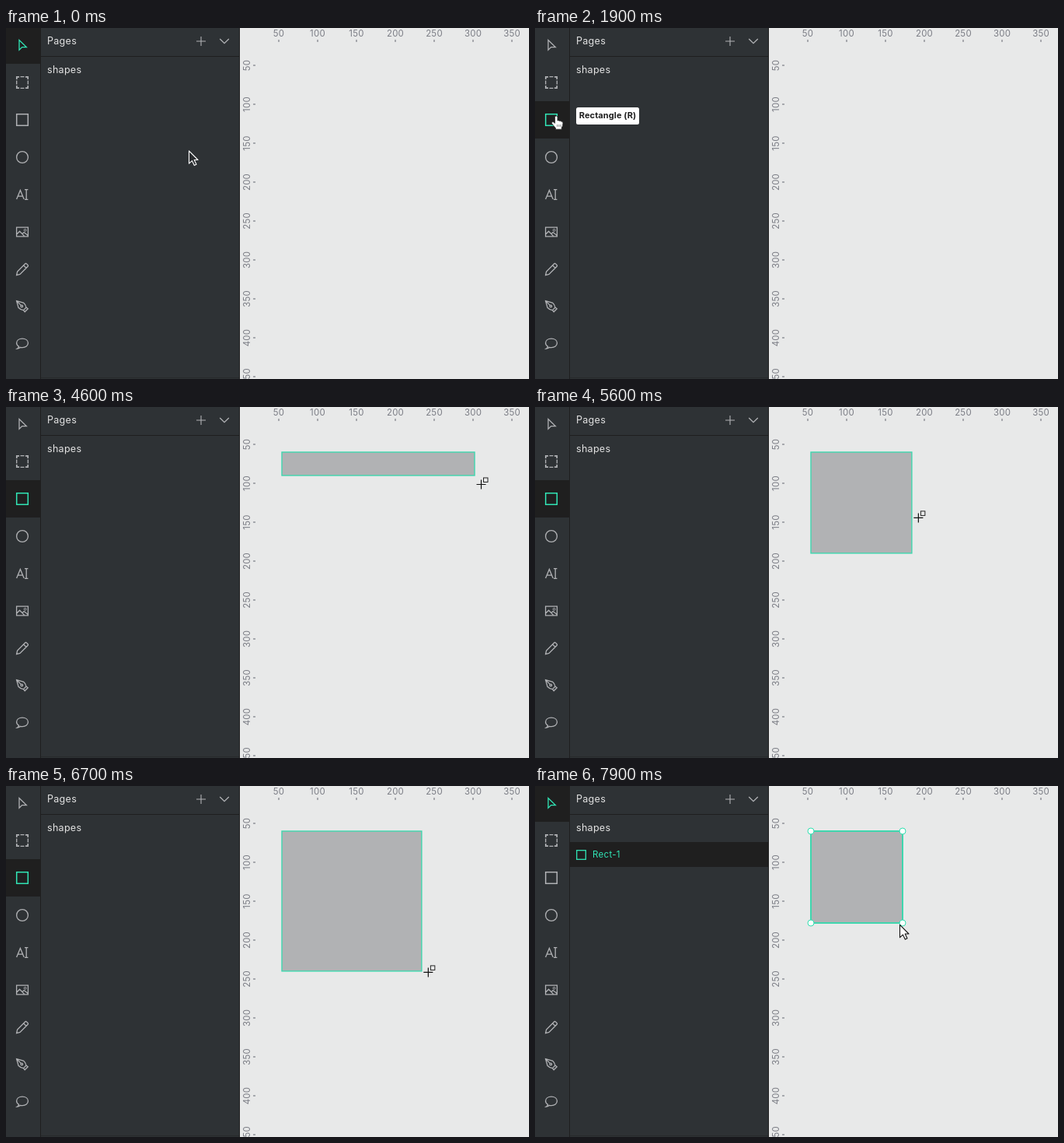
An HTML page that plays this animation: 673x451 px, repeating every 8000 ms.

```html
<!DOCTYPE html>
<html lang="en">
<head>
<meta charset="utf-8">
<title>Drawing a square</title>
<style>
  html, body { margin: 0; width: 100%; height: 100%; overflow: hidden; background: #e8e9e9; }
  svg { display: block; width: 100vw; height: 100vh; }
  text { font-family: Inter, "Open Sans", sans-serif; }
  .tool { color: #b1b2b5; }
  .tool.on { color: #31e6b6; }
  .tool .bg { fill: none; }
  .tool.on .bg { fill: #1f1f1f; }
  .line { fill: none; stroke: currentColor; stroke-width: 1.3; }
  .label { font-size: 12.5px; letter-spacing: .3px; fill: #e3e3e3; }
  .ruler text { font-size: 11.4px; letter-spacing: .25px; fill: #7b7d85; text-anchor: middle; }
  .ruler path { stroke: #7b7d85; stroke-width: 1.2; }
</style>
</head>
<body>
<svg viewBox="0 0 673 451">
  <rect width="673" height="451" fill="#e8e9e9"/>
  <g id="ruler" class="ruler"></g>

  <rect width="301" height="451" fill="#2e3235"/>
  <path d="M44.5 0V451M300.5 0V451M45 36.5H300" stroke="#1f1f1f"/>
  <path d="M45 449.5H300" stroke="#1f1f1f" opacity=".4"/>

  <g id="move" class="tool">
    <rect class="bg" width="44" height="46"/>
    <path class="line" d="M17 15.6V28.2L20.7 24.6H26.3Z"/>
  </g>
  <g class="tool line">
    <path stroke-width="1.7" d="M13.8 66V62.8H17M25 62.8H28.2V66M28.2 74V77.2H25M17 77.2H13.8V74"/>
    <path d="M18.5 62.7h5M18.5 77.3h5M13.7 67.5v5M28.3 67.5v5"/>
  </g>
  <g id="box" class="tool">
    <rect class="bg" y="94" width="44" height="48"/>
    <rect class="line" x="13.7" y="110.7" width="14.6" height="14.6" style="stroke-width:1.5"/>
  </g>
  <g class="tool line">
    <circle cx="21" cy="166" r="7.4"/>
    <path d="M13.6 220L18.4 208.4L23.2 220M15.2 216.2H21.6M24 207.6H28.4M24 220.4H28.4M26.2 207.6V220.4"/>
    <path d="M13.6 256.2H28.4V267.8H13.6ZM13.8 265L17.6 261.2L23.6 267.4M21 264.6L23.2 262.6L28.2 266.4"/>
    <circle cx="24.6" cy="259.8" r="1.4" stroke-width="1"/>
    <path d="M13.6 317.6L14.6 313L24.8 302.8Q25.6 302.2 26.4 302.9L28.2 304.7Q28.8 305.5 28.2 306.3L18 316.5ZM22.6 305L26 308.4"/>
    <path d="M13.6 350.6L22.5 353Q25.5 355.5 26 359L22.5 362.6Q18.5 362 16 359.2ZM14 351L19.3 356.4M26 359L28.2 360.8L24.2 364.7L22.5 362.6"/>
    <circle cx="20.3" cy="357.4" r="1.3"/>
    <path d="M16.6 409.4Q13.6 407.6 13.6 404.8C13.6 401.4 16.8 399.2 21 399.2S28.4 401.4 28.4 404.8S25.2 410.6 21 410.6Q19.6 410.6 18.6 410.3Q17 411.8 14.4 412Q16.2 410.8 16.6 409.4Z"/>
    <path d="M275.2 14L281 19.6L286.8 14"/>
    <path style="stroke-width:1.1" d="M245 17H257M251 11V23"/>
  </g>

  <text class="label" x="53" y="21">Pages</text>
  <text class="label" x="53" y="58">shapes</text>

  <g id="layer">
    <rect x="45" y="72" width="255" height="32" fill="#1f1f1f"/>
    <rect x="53.7" y="82.7" width="11.6" height="11.6" fill="none" stroke="#31e6b6" stroke-width="1.3"/>
    <text x="74" y="92" font-size="11.5" letter-spacing=".3" fill="#31e6b6">Rect-1</text>
  </g>

  <g id="tip">
    <rect x="53" y="102" width="81" height="22" rx="2.5" fill="#fff"/>
    <text x="93.5" y="116.4" font-size="11" font-weight="700" letter-spacing=".1" text-anchor="middle" fill="#1f1f1f">Rectangle (R)</text>
  </g>

  <rect id="shape" x="355" y="58" fill="#b1b2b4" stroke="#3fd6ae"/>
  <g id="handles" fill="#fff" stroke="#31dfb0"></g>

  <g id="arrow">
    <path d="M.5 .8V17.2L4.4 13.6L7.3 19.6L10 18.3L7.2 12.5H12Z" stroke-width="1.1" stroke-linejoin="round"/>
  </g>
  <g id="hand">
    <path d="M-1.9 .8Q-.2 -1 1.5 .8V6Q3 5.2 4 6.5Q5.4 5.8 6.3 7.1Q8.6 6.8 8.5 9.2Q8.5 13.5 6.8 15V17.2H-1V15.6Q-3.6 12.6 -5.9 9.6Q-6.4 7.7 -4.5 7.5Q-3 8 -1.9 9.4Z" fill="#fff" stroke="#222" stroke-width=".8"/>
    <path d="M1.2 11V14M3.4 11V14M5.6 11V14" stroke="#555" stroke-width=".7"/>
  </g>
  <g id="cross" fill="none" stroke="#111">
    <path d="M-6 0H6M0 -6V6" stroke-width="1.2"/>
    <rect x="3" y="-8.5" width="5.5" height="5.5" stroke-width=".9"/>
  </g>
</svg>
<script>
const $ = id => document.getElementById(id);
const LOOP = 8000, STEP = 100, X0 = 355, Y0 = 58, SIDE = 118;
const HOVER = 1000, PICK = 1900, LEAVE = 2800, DRAG = 3800, SQUARE = 5300, DROP = 7900;

const smooth = u => u * u * (3 - 2 * u);
const linear = u => u;
const mix = (a, b, u) => a + (b - a) * u;
const progress = (t, from, to) => Math.min(1, Math.max(0, (t - from) / (to - from)));

// Pointer moves; "via" bends the way into a quadratic curve.
const home = [235, 157];
const moves = [
  { from: 100, to: HOVER, end: [27.5, 113], ease: smooth },
  { from: 2600, to: 3600, end: [363.5, 69.5], via: [100, 238], ease: smooth },
  { from: 3700, to: 4600, end: [611.5, 99.5], ease: smooth },
  { from: 5200, to: 6000, end: [488, 196], via: [437, 137], ease: linear },
  { from: 6100, to: 6450, end: [552.5, 246.5], ease: smooth },
  { from: 6450, to: 7600, end: [477, 188], ease: smooth }
];

function pointer(t) {
  let at = home;
  for (const { from, to, end, via, ease } of moves) {
    if (t <= from) break;
    const u = ease(progress(t, from, to));
    at = at.map((a, k) => via
      ? mix(mix(a, via[k], u), mix(via[k], end[k], u), u)
      : mix(a, end[k], u));
  }
  return at;
}

function show(id, on) {
  $(id).style.display = on ? "" : "none";
}

function attrs(id, map) {
  for (const k in map) $(id).setAttribute(k, map[k]);
}

function drawShape(t, x, y) {
  const done = t >= DROP;
  let w = Math.max(0, x - 8.5 - X0), h = Math.max(0, y - 11.5 - Y0);
  if (t >= SQUARE) w = h = Math.max(w, h);
  if (done) w = h = SIDE;
  show("shape", t >= DRAG);
  attrs("shape", { width: w, height: h, "stroke-width": done ? 2 : 1.4 });
  show("handles", done);
}

function drawPointer(kind, x, y, done) {
  for (const id of ["arrow", "hand", "cross"]) show(id, id === kind);
  attrs(kind, { transform: `translate(${x} ${y})` });
  attrs("arrow", { fill: done ? "#fff" : "#2a2d30", stroke: done ? "#111" : "#fff" });
}

function draw(t) {
  const done = t >= DROP;
  const [x, y] = done ? [469, 177.5] : pointer(t);
  const hover = x < 44;
  drawPointer(hover ? "hand" : x > 301 && !done ? "cross" : "arrow", x, y, done);
  drawShape(t, x, y);
  $("move").classList.toggle("on", t < PICK || done);
  $("box").classList.toggle("on", !done && (t >= PICK || hover));
  show("tip", t > HOVER && t < LEAVE);
  $("tip").style.opacity = smooth(progress(t, HOVER, 1600));
  show("layer", done);
}

let marks = "";
for (let n = 50; n <= 450; n += 50) {
  const x = 301 + n, y = n - 2;
  marks += `<text x="${x}" y="11">${n}</text><path d="M${x} 15V18"/>`
    + `<text transform="translate(314 ${y}) rotate(-90)">${n}</text><path d="M318 ${y}H321"/>`;
}
$("ruler").innerHTML = marks;
$("handles").innerHTML = [[0, 0], [SIDE, 0], [0, SIDE], [SIDE, SIDE]]
  .map(([x, y]) => `<circle cx="${X0 + x}" cy="${Y0 + y}" r="4"/>`).join("");

const start = performance.now();
function frame() {
  const t = (performance.now() - start) % LOOP;
  draw(Math.floor(t / STEP) * STEP);
  requestAnimationFrame(frame);
}
frame();
</script>
</body>
</html>
```
